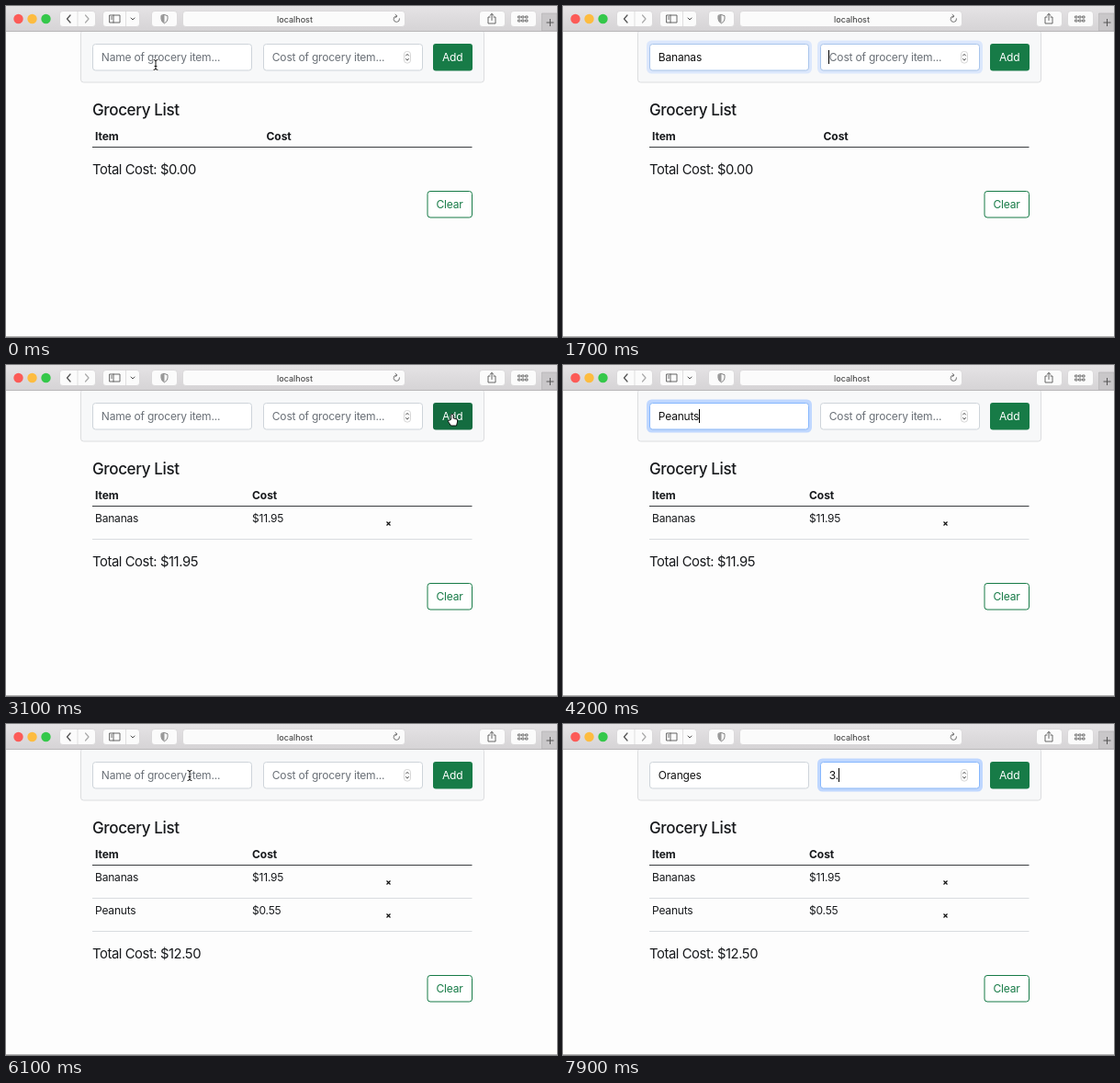
These frames come from a looping animation (600x360 px, 8000 ms). An HTML page:

```html
<!DOCTYPE html>
<html lang="en">
<head>
<meta charset="utf-8">
<title>Grocery List</title>
<style>
  html, body { margin: 0; width: 100%; height: 100%; overflow: hidden; background: #fdfdfd; }
  svg { display: block; }
  text { font: 12px Inter, sans-serif; letter-spacing: -.19px; fill: #17191c; white-space: pre; }
  .bold { font-weight: 700; letter-spacing: -.05px; }
  .title { font-size: 17px; font-weight: 500; letter-spacing: -.36px; }
  .total { font-size: 14.8px; letter-spacing: -.42px; }
  .host { font-size: 9.1px; letter-spacing: 0; fill: #333; }
  .tool { fill: #fbfbfb; stroke: #cfcdcf; stroke-width: .6; }
  .icon { fill: none; stroke: #555; stroke-linecap: round; stroke-linejoin: round; }
  .field { fill: #fff; stroke: #ced4da; }
  .ring { fill: #bfd7ff; stroke: none; }
  .glow { fill: #fff; stroke: #86b7fe; }
  .divide { stroke: #d9dcdf; }
</style>
</head>
<body>
<svg width="600" height="360" viewBox="0 0 600 360">
  <defs>
    <linearGradient id="bar" x2="0" y2="1">
      <stop stop-color="#e5e3e5"/><stop offset="1" stop-color="#d5d3d5"/>
    </linearGradient>
    <g id="beam" fill="none" stroke-linecap="round">
      <path id="beamLine" d="M-2-5.5Q0-5.5 0-4Q0-5.5 2-5.5M0-4V4M-2 5.5Q0 5.5 0 4Q0 5.5 2 5.5M-1 1.5H1" stroke="#fff" stroke-width="2.4"/>
      <use href="#beamLine" style="stroke:#000"/>
      <path d="M-2-5.5Q0-5.5 0-4Q0-5.5 2-5.5M0-4V4M-2 5.5Q0 5.5 0 4Q0 5.5 2 5.5M-1 1.5H1" stroke="#111"/>
    </g>
    <path id="arrow" d="M0 0V11L2.6 8.6L4.3 12.4L6 11.6L4.4 8H8Z" fill="#000" stroke="#fff" stroke-width=".8"/>
    <path id="hand" d="M-1.2 1V-4Q0-5.5 1.2-4V0L5 1Q6 1.5 5.5 4L4.5 8H-1.5L-4.5 3.5Q-5 1.5-3 2.2Z" fill="#fff" stroke="#000" stroke-width=".9"/>
  </defs>

  <rect x="81.5" y="26.5" width="439" height="56.5" rx="3" fill="#f7f8f9" stroke="#dcdddf"/>
  <rect width="600" height="28" fill="url(#bar)"/>
  <path d="M0 27.5H600" stroke="#b9b7b9"/>
  <circle cx="13.5" cy="14" r="5.2" fill="#fc5b57"/>
  <circle cx="28.5" cy="14" r="5.2" fill="#fdbc40"/>
  <circle cx="43.5" cy="14" r="5.2" fill="#34c84a"/>
  <g class="tool">
    <rect x="58.5" y="5.5" width="39" height="17" rx="3.5"/>
    <rect x="105.5" y="5.5" width="40" height="17" rx="3.5"/>
    <rect x="158.5" y="5.5" width="28" height="17" rx="3.5"/>
    <rect x="192.5" y="5.5" width="242" height="17" rx="3.5"/>
    <rect x="515.5" y="5.5" width="28" height="17" rx="3.5"/>
    <rect x="549.5" y="5.5" width="28" height="17" rx="3.5"/>
    <path d="M78 5.5V22.5M130.5 5.5V22.5"/>
  </g>
  <g class="icon">
    <path d="M70 10L66.5 14L70 18" stroke-width="1.3"/>
    <path d="M86.5 10L90 14L86.5 18" stroke="#aaa" stroke-width="1.2"/>
    <path d="M113 10H124V18H113ZM117 10V18M114.5 12H115.5M114.5 14H115.5" stroke-width=".9"/>
    <path d="M136 13L138 15L140 13"/>
    <path d="M172.500 9.500L176 10.700V14Q176 17 172.500 18.800Q169 17 169 14V10.700Z" stroke="#777" stroke-width=".9"/>
    <path d="M172.500 9.500V18.800Q169 17 169 14V10.700Z" fill="#999" stroke="none"/>
    <path d="M428.500 13.800A3.200 3.200 0 1 1 425 11M424 9.300L426 11L424.200 12.600" stroke="#666" stroke-width=".9"/>
    <path d="M527 12H525V19H533V12H531M529 15.500V8.500M527 10.300L529 8.500L531 10.300" stroke-width=".9"/>
    <path d="M558 11H560V13H558ZM562 11H564V13H562ZM566 11H568V13H566ZM558 15H560V17H558ZM562 15H564V17H562ZM566 15H568V17H566Z" stroke-width=".8"/>
  </g>
  <path d="M583.500 8V27H600V8Z" fill="#c9c7c9" stroke="#b5b3b5" stroke-width=".7"/>
  <path d="M588.500 18H596.500M592.500 14V22" stroke="#555"/>
  <text class="host" x="295" y="17.600">localhost</text>

  <g id="fields"></g>
  <rect id="add" x="465" y="41" width="43" height="29.500" rx="3"/>
  <text x="475" y="60" style="fill:#fff">Add</text>

  <text class="title" x="94" y="119">Grocery List</text>
  <text class="bold" x="97" y="146">Item</text>
  <text class="bold" id="costHead" y="146">Cost</text>
  <path d="M94 153.500H507.500" stroke="#3a3d40"/>
  <g id="rows"></g>
  <g id="footer">
    <text class="total" id="total" x="94" y="183"></text>
    <rect x="459" y="201.500" width="48.500" height="28.500" rx="3" fill="#fff" stroke="#177b47"/>
    <text x="468.500" y="220" style="fill:#177b47">Clear</text>
  </g>
  <path d="M0 359.500H600" stroke="#b4b4b4"/>
  <use id="mouse"/>
</svg>
<script>
const $ = id => document.getElementById(id);

const fields = [[94.5, 'Name of grocery item...'], [280.5, 'Cost of grocery item...']].map(([x, hint], i) => {
  const g = document.createElementNS('http://www.w3.org/2000/svg', 'g');
  g.innerHTML = `
    <g class="focus">
      <rect class="ring" x="${x - 3.5}" y="37.5" width="180" height="36" rx="5.5"/>
    </g>
    <rect class="field" x="${x}" y="41.500" width="173" height="28.500" rx="3"/>
    <g class="focus"><rect class="glow" x="${x}" y="41.500" width="173" height="28.500" rx="3"/></g>
    <text x="${x + 9.3}" y="60"></text>
    <path class="caret" stroke="#000"/>
    ${i ? `<rect x="433.500" y="49.500" width="7" height="12.500" rx="3" fill="#fff" stroke="#c4c4c4" stroke-width=".7"/>
    <path class="icon" d="M435.500 54L437 52.300L438.500 54M435.500 57.500L437 59.200L438.500 57.500"/>` : ''}`;
  $('fields').append(g);
  return { x: x + 9.3, hint, glows: g.querySelectorAll('.focus'), text: g.querySelector('text'), caret: g.querySelector('.caret') };
});

// [time, field, value]; field -1 submits the form
const events = [
  [100, 0, ''], [200, 0, ''], [600, 0, 'B'], [700, 0, 'Ba'], [900, 0, 'Ban'], [1000, 0, 'Bana'],
  [1200, 0, 'Banan'], [1400, 0, 'Bananas'], [1600, 0, 'Bananas'],
  [1700, 1, ''], [1800, 1, ''], [2200, 1, '1'], [2400, 1, '11.9'], [2600, 1, '11.95'], [3000, -1],
  [3500, 0, ''], [3600, 0, 'P'], [3700, 0, 'Pe'], [3900, 0, 'Pean'], [4000, 0, 'Peanu'], [4200, 0, 'Peanuts'],
  [4400, 1, ''], [4500, 1, ''], [4600, 1, '0'], [4700, 1, '0.'], [4900, 1, '0.5'], [5200, 1, '0.55'], [5600, -1],
  [6200, 0, ''], [6700, 0, 'O'], [6800, 0, 'Or'], [6900, 0, 'Ora'], [7000, 0, 'Oran'], [7100, 0, 'Orange'],
  [7200, 0, 'Oranges'], [7400, 1, ''], [7500, 1, ''], [7900, 1, '3.']
];

// [time, x, y]; no position hides the pointer
const moves = [
  [0, 163, 64], [100, 163, 58], [600],
  [2600, 235, 45], [2700, 365, 47], [2800, 455, 52], [2900, 486, 58], [3300, 400, 56], [3500, 190, 56], [3600],
  [5300, 260, 48], [5400, 430, 54], [5500, 486, 58], [5900, 440, 56], [6000, 300, 56], [6100, 200, 56], [6200, 197, 56], [6700]
];

const money = n => '$' + n.toFixed(2);
const inField = x => (x > 94 && x < 268) || (x > 280 && x < 453);

function stateAt(t) {
  const s = { values: ['', ''], rows: [], focus: -1, before: -1, since: -1000, last: -1000 };
  for (const [time, field, value] of events) {
    if (time > t) break;
    if (field !== s.focus) Object.assign(s, { before: s.focus, focus: field, since: time });
    if (field < 0) {
      s.rows.push([s.values[0], +s.values[1]]);
      s.values = ['', ''];
    } else s.values[field] = value;
    s.last = time;
  }
  return s;
}

function drawRow([name, cost], i) {
  const y = 171 + 36 * i;
  return `<text x="97" y="${y}">${name}</text><text x="268" y="${y}">${money(cost)}</text>
    <path d="M414.500 ${y - .5}l4 4m0-4l-4 4" stroke="#111" stroke-width="1.200"/>
    <path class="divide" d="M94 ${y + 18.5}H507.500"/>`;
}

function draw(t) {
  const s = stateAt(t);
  const fade = Math.min(1, (t - s.since + 50) / 100);
  fields.forEach((f, i) => {
    const value = s.values[i];
    const glow = i === s.focus ? fade : i === s.before ? 1 - fade : 0;
    f.glows.forEach(g => g.setAttribute('opacity', glow));
    f.text.textContent = value || f.hint;
    f.text.style.fill = value ? '#111' : '#6a7077';
    const end = f.x + (value ? f.text.getComputedTextLength() + .7 : 0);
    const blinkOn = i === s.focus && t - s.last < 200;
    f.caret.setAttribute('d', blinkOn ? `M${Math.floor(end) + .5} 48V63` : '');
  });

  $('rows').innerHTML = s.rows.map(drawRow).join('');
  $('costHead').setAttribute('x', s.rows.length ? 268 : 283.5);
  $('total').textContent = 'Total Cost: ' + money(s.rows.reduce((sum, row) => sum + row[1], 0));
  $('footer').setAttribute('transform', `translate(0 ${36 * s.rows.length})`);

  const [, x, y] = moves.filter(m => m[0] <= t).pop();
  const onAdd = x > 465;
  $('add').setAttribute('fill', onAdd ? '#146c40' : '#177b47');
  $('mouse').setAttribute('href', onAdd ? '#hand' : inField(x) ? '#beam' : '#arrow');
  $('mouse').setAttribute('transform', `translate(${x || -50} ${y || -50})`);
}

function tick() {
  draw(Math.floor(performance.now() % 8000 / 100) * 100);
  requestAnimationFrame(tick);
}
tick();
</script>
</body>
</html>
```
